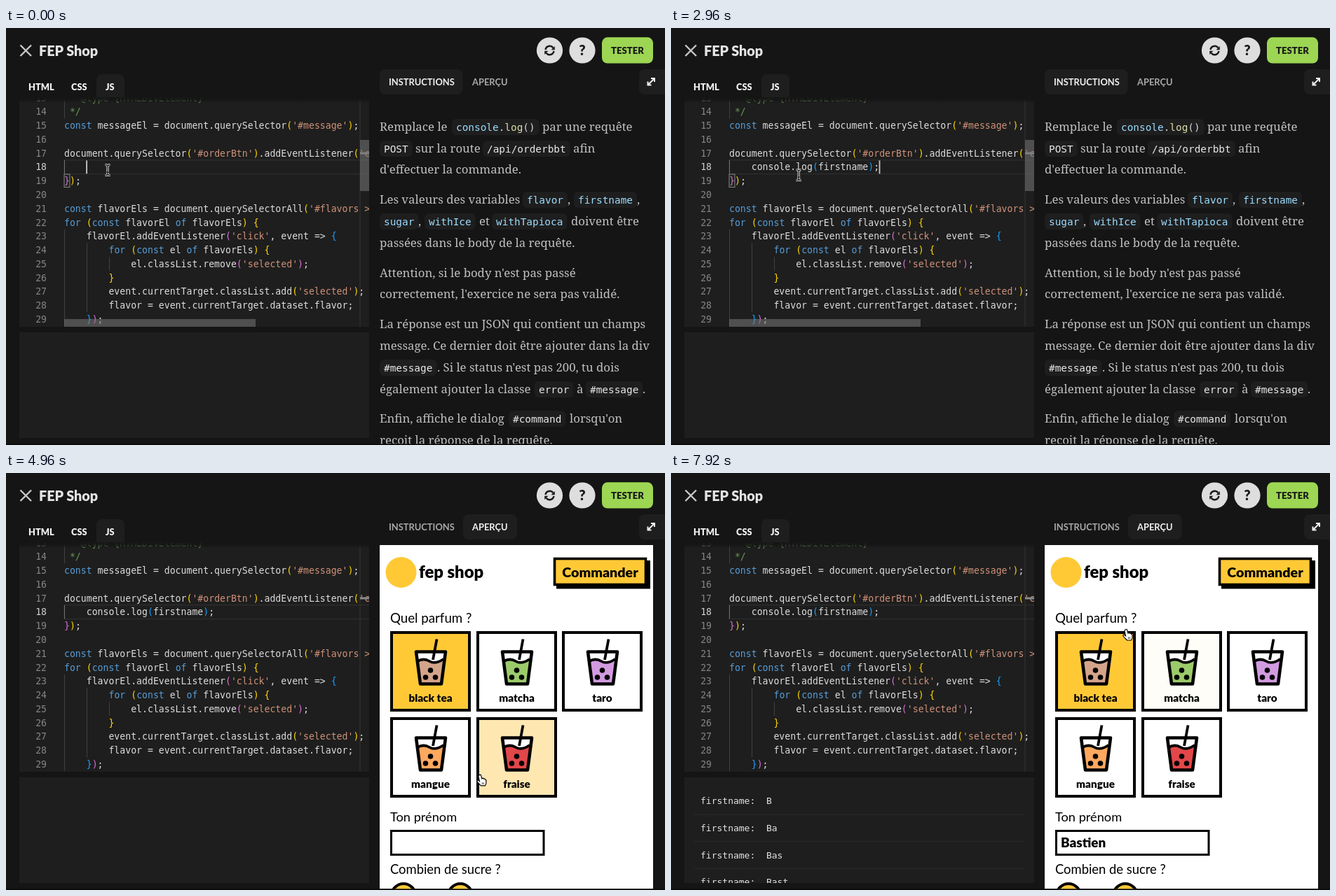
An HTML page that plays this animation: 940 by 596 pixels, repeating every 8 s.

```html
<!DOCTYPE html>
<html lang="fr">
<head>
<meta charset="utf-8">
<title>FEP Shop</title>
<style>
  html, body { margin: 0; width: 100%; height: 100%; overflow: hidden; background: #151515; }
  svg { display: block; width: 940px; height: 596px; }
  text { white-space: pre; }
  .ui { font-family: Lato, sans-serif; font-weight: 700; }
  .heavy { font-family: Lato, sans-serif; font-weight: 900; }
  .plain { font-family: Lato, sans-serif; font-weight: 400; }
  .mono { font-family: "DejaVu Sans Mono", monospace; }
  .serif { font-family: "Noto Serif", serif; }
  .quote { font-family: "Noto Serif", serif; font-style: italic; }
  .sys { font-family: Inter, sans-serif; font-weight: 500; }
</style>
</head>
<body>
<svg id="stage" viewBox="0 0 940 596"></svg>
<script>
const LOOP = 8000, STEP = 80;
const CHAR = 7.93, CODE_X = 83, CODE_SIZE = 13.18, ROW = 19.77;
const YELLOW = '#ffc936';
const NAME = 'Bastien';

const clamp = v => Math.max(0, Math.min(1, v));
const smooth = v => (v = clamp(v)) * v * (3 - 2 * v);
const baseline = line => 124.4 + ROW * (line - 14);

const rect = (x, y, w, h, fill, extra = '') =>
  `<rect x="${x}" y="${y}" width="${w}" height="${h}" fill="${fill}" ${extra}/>`;
const path = (d, stroke, width, fill = 'none', extra = '') =>
  `<path d="${d}" stroke="${stroke}" stroke-width="${width}" fill="${fill}" ${extra}/>`;
const circle = (x, y, r, fill, extra = '') => `<circle cx="${x}" cy="${y}" r="${r}" fill="${fill}" ${extra}/>`;
const text = (cls, x, y, size, fill, content, extra = '') =>
  `<text class="${cls}" x="${x}" y="${y}" font-size="${size}" fill="${fill}" ${extra}>${content}</text>`;
const tint = (fill, content, extra = '') => `<tspan fill="${fill}" ${extra}>${content}</tspan>`;
const bold = (fill, content) => tint(fill, content, 'font-weight="700"');
const at = (steps, t) => steps.filter(s => s[0] <= t).pop();

// ---- Code editor ----
const typing = [
  [0, ''], [160, 'c'], [240, 'co'], [320, 'con'], [400, 'cons'], [480, 'console'],
  [1040, 'console.'], [1120, 'console.l'], [1200, 'console.lo'], [1280, 'console.log'],
  [1440, 'console.log()'], [1840, 'console.log(f)'], [1920, 'console.log(fi)'],
  [2160, 'console.log(firstname)'], [2640, 'console.log(firstname);']
];
const codeLines = typed => [
  ' * @type {HTMLDivElement}',
  ' */',
  "const messageEl = document.querySelector('#message');",
  '',
  "document.querySelector('#orderBtn').addEventListener('click', event => {",
  '    ' + typed,
  '});',
  '',
  "const flavorEls = document.querySelectorAll('#flavors > div');",
  'for (const flavorEl of flavorEls) {',
  "    flavorEl.addEventListener('click', event => {",
  '        for (const el of flavorEls) {',
  "            el.classList.remove('selected');",
  '        }',
  "        event.currentTarget.classList.add('selected');",
  '        flavor = event.currentTarget.dataset.flavor;',
  '    });'
];

function highlighter() {
  const colors = ['#ffd700', '#da70d6', '#179fff'];
  let depth = 0;
  return line => line.startsWith(' *') ? tint('#6a9955', line)
    : line.replace(/'[^']*'|\b(?:const|for|of)\b|[(){}]/g, token => {
      if (token[0] === "'") return tint('#ce9178', token);
      if ('({'.includes(token)) return tint(colors[depth++ % 3], token);
      if (')}'.includes(token)) return tint(colors[--depth % 3], token);
      return tint('#569cd6', token);
    });
}

const bracketBox = (column, line) =>
  rect(CODE_X + column * CHAR, baseline(line) - 14.2, CHAR, 18.5, '#1b3a1b33', 'stroke="#888"');
const guide = (x, from, to, color = '#404040') =>
  path(`M${x} ${baseline(from) - 14.7}V${baseline(to) + 5}`, color, 1);

function editor(t) {
  const typed = at(typing, t)[1];
  const inCall = t >= 1440 && t < 2560;
  const column = 4 + typed.length - (inCall ? 1 : 0);
  const focused = t < 4000;
  const blinkOff = [[640, 880], [1680, 1840], [2320, 2560], [3280, 3840]].some(([a, b]) => t >= a && t < b);
  const barOpacity = .55 * clamp((3450 - t) / 300);
  const paint = highlighter();
  let out = rect(19, 102, 499, 325, '#1e1e1e')
    + rect(CODE_X, baseline(18) - 14.7, 440, ROW, 'none', 'stroke="#2c2c2c" stroke-width="1.5"')
    + guide(83.5, 13, 14) + guide(83.5, 18, 18, '#707070')
    + guide(83.5, 23, 29) + guide(115.5, 24, 28) + guide(147.5, 25, 25);
  if (focused) out += inCall ? bracketBox(15, 18) + bracketBox(column, 18) : bracketBox(0, 19);
  codeLines(typed).forEach((line, i) => {
    const n = 13 + i;
    out += text('mono', 58, baseline(n), CODE_SIZE, n === 18 ? '#d0d0d0' : '#858585', n, 'text-anchor="end"')
      + text('mono', CODE_X, baseline(n), CODE_SIZE, '#dcdcdc', paint(line));
  });
  if (focused && !blinkOff) out += rect(CODE_X + column * CHAR - .5, baseline(18) - 14.2, 1.8, 19, '#c8c8c8');
  out += path('M505 102V427', '#343434', 1) + rect(505, 177.5, 13, 3, '#8a8a8a')
    + `<g opacity="${barOpacity}">${rect(505, 160, 13, 73, '#797979')}${rect(83, 416, 273, 11, '#797979')}</g>`
    + rect(19, 99, 499, 8, 'url(#shade)');
  return `<g clip-path="url(#editorClip)">${out}</g>`;
}

// ---- Completion popups ----
const globals = ['console', 'const', 'continue', 'confirm', 'cookieStore', 'CompositionEvent',
  'CompressionStream', 'ConstantSourceNode', 'ConvolverNode', 'CountQueuingStrategy', 'Comment', 'const'];
const methods = ['assert', 'clear', 'count', 'countReset', 'debug', 'dir', 'dirxml', 'error',
  'group', 'groupCollapsed', 'groupEnd', 'info'];
const fileItems = ['firstname', 'finally', 'File', 'FileList', 'FileReader',
  ...['', 'DirectoryEntry', 'DirectoryHandle', 'DirectoryReader', 'Entry', 'FileEntry', 'FileHandle'].map(s => 'FileSystem' + s)];

function itemIcon(label, x, y) {
  if (label === 'firstname')
    return path(`M${x} ${y + 5}l6-6a3.5 3.5 0 0 1 4-4l-2 2 2 2 2-2a3.5 3.5 0 0 1-4 4l-6 6z`, '#d4d4d4', 1.3);
  if (label === 'finally')
    return path(`M${x} ${y - 4}h5m2 0h5m-12 3h8m2 0h2m-12 3h4m2 0h6m-12 3h9`, '#c5c5c5', 1.4);
  return path(`M${x + 2.5} ${y - 4}h-2v8h2m7-8h2v8h-2`, '#75beff', 1.1)
    + circle(x + 6, y, 2.4, 'none', 'stroke="#75beff"')
    + path(`M${x + 3.5} ${y + 2.5}l5-5`, '#75beff', .9);
}

function suggestions(x, items, matched, detail = '') {
  const top = 209.5, width = 404.5;
  let out = rect(x, top, width, items.length * ROW + 1, '#252526', 'stroke="#454545"')
    + rect(x + .5, top, width - 1, ROW, '#04395e');
  items.forEach((label, i) => {
    const y = top + 10 + i * ROW;
    out += itemIcon(label, x + 4, y) + text('mono', x + 22, y + 4.6, CODE_SIZE, i ? '#d4d4d4' : '#fff',
      bold('#2aaaff', label.slice(0, matched)) + label.slice(matched));
  });
  if (items.length > 11) out += rect(x + 395, top, 9.5, 144.5, '#797979', 'opacity=".6"');
  return out + text('mono', x + 394, top + 14.2, 11.07, '#e0e0e0', detail, 'text-anchor="end"');
}

function popups(t) {
  let out = '';
  if (t >= 1440 && t < 2560)
    out += rect(226.5, 160.5, 209, 28, '#252526', 'stroke="#454545"')
      + text('mono', 233, 179, CODE_SIZE, '#d4d4d4', 'log(' + bold('#18a3ff', '...data: any[]') + '): void');
  if (t >= 240 && t < 480) out += suggestions(131, globals, Math.floor(t / STEP) - 1);
  if (t >= 1040 && t < 1120) out += suggestions(178.5, methods, 0);
  if (t >= 1120 && t < 1280) out += suggestions(178.5, ['log'], t < 1200 ? 1 : 2);
  if (t >= 1920 && t < 2160) out += suggestions(226.5, fileItems, 2, 'let firstname: string');
  return out;
}

// ---- Console ----
const nameLength = t => t < 5840 ? 0 : Math.min(NAME.length, 1 + Math.floor((t - 5840) / 53.3));

function logs(t) {
  let out = rect(19, 435, 499, 151, '#1e1e1e');
  for (let i = 0; i < Math.min(4, nameLength(t)); i++) {
    const y = 468.5 + i * 38.7;
    out += text('mono', 42, y + 4.6, 13, '#e4e4e4', 'firstname:  ' + NAME.slice(0, i + 1))
      + path(`M33 ${y + 19.5}H503`, '#2a2a2a', 1);
  }
  return `<g clip-path="url(#consoleClip)">${out}</g>`;
}

// ---- Instructions ----
const prose = (x, y, s) => text('serif', x, y + 6, 16.8, '#c0c0c0', s);
const quote = (x, y, s) => text('quote', x, y, 14.3, '#c0c0c0', s);
const chip = (x, y, s, color = '#e8e8e8', html = s) =>
  rect(x - 6, y - 11, s.length * 8.67 + 12, 23, '#1e1e1e', 'rx="6"') + text('mono', x, y + 5.5, 14.4, color, html);
const variable = (x, y, s) => chip(x, y, s, '#9cdcfe');

const instructions = prose(533, 141, 'Remplace le')
  + chip(642, 141, 'console.log()', '#d4d4d4', tint('#9cdcfe', 'console') + '.' + tint('#dcdcaa', 'log') + '()')
  + prose(765, 141, 'par une requête')
  + chip(539, 172, 'POST') + prose(584, 172, 'sur la route') + chip(686, 172, '/api/orderbbt') + prose(809, 172, 'afin')
  + prose(533, 202, "d'effectuer la commande.")
  + prose(533, 245, 'Les valeurs des variables') + variable(743, 245, 'flavor') + prose(801, 245, ',')
  + variable(816, 245, 'firstname') + prose(900, 245, ',')
  + variable(539, 276, 'sugar') + prose(588, 276, ',') + variable(603, 276, 'withIce') + prose(675, 276, 'et')
  + variable(699, 276, 'withTapioca') + prose(806, 276, 'doivent être')
  + prose(533, 307, 'passées dans le body de la requête.')
  + prose(533, 350, "Attention, si le body n'est pas passé")
  + prose(533, 380, "correctement, l'exercice ne sera pas validé.")
  + prose(533, 423, 'La réponse est un JSON qui contient un champs')
  + prose(533, 454, 'message. Ce dernier doit être ajouter dans la div')
  + chip(539, 485, '#message') + prose(615, 485, ". Si le status n'est pas 200, tu dois")
  + prose(533, 516, 'également ajouter la classe') + chip(760, 516, 'error') + prose(814, 516, 'à')
  + chip(833, 516, '#message') + prose(908, 516, '.')
  + prose(533, 558, 'Enfin, affiche le dialog') + chip(723, 558, '#command') + prose(804, 558, "lorsqu'on")
  + prose(533, 588.5, 'reçoit la réponse de la requête.')
  + rect(542, 619, 3.5, 73, '#d8d8d8')
  + '<g transform="rotate(-12 569 640)">' + circle(569, 637.5, 4.8, '#f6e3c0') + rect(567, 642, 4, 5, '#a9a9a9', 'rx="1"') + '</g>'
  + quote(580, 646.5, "N'hésite pas à rechercher comment on")
  + quote(560, 674.5, 'affiche un élément')
  + rect(685, 659, 73, 22, '#1e1e1e', 'rx="6"')
  + text('mono', 690, 674.5, 13.1, '#808080', '&lt;' + tint('#569cd6', 'dialog') + '&gt;', 'font-style="italic"')
  + quote(763, 674.5, 'en JavaScript');

function instructionPanel(t) {
  const scroll = 112 * smooth((t - 3200) / 360);
  return `<g clip-path="url(#panelClip)"><g transform="translate(0 ${-scroll})">${instructions}</g></g>`
    + (scroll ? rect(931, 104 + scroll * .82, 7, 394, '#0c0c0c', 'rx="3"') : '');
}

// ---- Preview ----
const cards = [
  ['black tea', '#d4a48a', 548, 226], ['matcha', '#9ccb6b', 671, 226], ['taro', '#d29be0', 793, 226],
  ['mangue', '#ffa85f', 548, 349], ['fraise', '#e2474a', 671, 349]
];
const cup = color =>
  path('M37 29.5H79L73 75.5H43Z', 'none', 0, '#fff')
  + path('M39 43q9-5 17 0t20-3L72 75H43Z', 'none', 0, color)
  + path('M39 43q9-5 17 0t20-3M61 41L66.5 11.5', '#000', 3.8)
  + path('M37 29.5H79L73 75.5H43Z', '#000', 4.6, 'none', 'stroke-linejoin="round"')
  + circle(57.5, 56, 3.8, '#000') + circle(50.5, 66, 3.8, '#000') + circle(64.5, 66, 3.8, '#000');

const inCard = ([x, y], card) => x > card[2] && x < card[2] + 115 && y > card[3] && y < card[3] + 115;

// A 200 ms linear fade equals the share of that window spent inside the card.
function hover(t, card) {
  let inside = 0;
  for (let k = 0; k < 10; k++) {
    const past = t - k * 20;
    if (past >= 4040 && inCard(mouse(past), card)) inside++;
  }
  return inside / 10;
}

function preview(t) {
  let out = rect(533, 103, 390, 491.5, '#fff') + circle(563.5, 142, 22, YELLOW)
    + text('heavy', 589, 150, 23.8, '#000', 'fep shop')
    + rect(785, 125, 134, 40.5, '#000')
    + rect(782.5, 122.5, 130, 37, YELLOW, 'stroke="#000" stroke-width="3.6"')
    + text('heavy', 847.5, 149, 19.7, '#000', 'Commander', 'text-anchor="middle"')
    + text('plain', 548, 213.5, 18.7, '#000', 'Quel parfum ?')
    + text('plain', 548, 498, 18.2, '#000', 'Ton prénom')
    + text('plain', 548, 572.5, 18.4, '#000', 'Combien de sucre ?');
  cards.forEach((card, i) => {
    const [label, color, x, y] = card;
    out += `<g transform="translate(${x} ${y})">` + rect(2, 2, 111, 111, i ? '#fff' : YELLOW)
      + (i ? rect(2, 2, 111, 111, '#ffe7b2', `opacity="${hover(t, card)}"`) : '')
      + rect(2, 2, 111, 111, 'none', 'stroke="#000" stroke-width="4"') + cup(color)
      + text('heavy', 57.5, 100.5, 15.3, '#000', label, 'text-anchor="middle"') + '</g>';
  });
  out += rect(549.5, 511.5, 217.5, 34, '#fff', 'stroke="#000" stroke-width="3"')
    + text('heavy', 556, 535, 18.9, '#000', NAME.slice(0, nameLength(t)));
  for (const x of [567, 648]) out += circle(x, 604, 17, YELLOW, 'stroke="#000" stroke-width="4"');
  if (t >= 5600 && t < 6160)
    out += path('M649 557L658 548L667 557Z', 'none', 0, '#1e1e1e') + rect(639, 556, 146.5, 60, '#1e1e1e', 'rx="7"')
      + text('sys', 650, 581, 12.8, '#e4e4e4', NAME);
  return `<g clip-path="url(#panelClip)">${out}</g>`;
}

// ---- Pointer ----
const stops = [
  [0, 145, 203], [2900, 145, 203], [3280, 700, 310], [3600, 707, 318], [3760, 707, 250], [4000, 692, 80],
  [4060, 692, 80], [4280, 735, 410], [4480, 718, 361], [4640, 715, 370], [4700, 715, 370], [5200, 645, 500],
  [5520, 625, 531], [6340, 625, 531], [6800, 730, 380], [7200, 735, 290], [7640, 735, 290],
  [7765, 667, 246], [7920, 651, 231], [LOOP, 651, 231]
];
function mouse(t) {
  const i = Math.max(1, stops.findIndex(s => s[0] > t));
  const [a, b] = [stops[i - 1], stops[i]];
  const k = smooth((t - a[0]) / (b[0] - a[0]));
  return [a[1] + (b[1] - a[1]) * k, a[2] + (b[2] - a[2]) * k];
}

function pointer(t) {
  if ((t >= 160 && t < 2960) || (t >= 5840 && t < 6400)) return '';
  const [x, y] = mouse(t);
  const showsPreview = t >= 4040;
  const onInput = x > 548 && x < 768 && y > 510 && y < 547;
  const overText = showsPreview ? onInput : y > 105;
  const overLink = y < 95 || (showsPreview && cards.some(c => inCard([x, y], c)));
  const beam = 'M-3.5-7.5Q0-7.5 0-5V5.5Q0 7.5-3.5 7.5M3.5-7.5Q0-7.5 0-5V5.5Q0 7.5 3.5 7.5M-2 3H2';
  const hand = 'M-3-7Q-1.5-8.5-.5-7L1-2Q2.5-3.5 3.5-1.8Q5-2.5 5.7-.7Q7-.8 7 1Q7.5 5 5.5 8H-.5Q-4 4.5-6 2Q-6.5 0-4.5 .2L-2.5 1.7L-4-5Q-4-6.5-3-7Z';
  const shape = overText ? path(beam, '#fff', 3) + path(beam, '#111', 1.3)
    : overLink ? path(hand, '#000', 1.2, '#fff') + path('M1.5 3.5V6M3.5 3.5V6', '#000', .8)
    : path('M-4-8V6L-1 3.5L1 8.5L3.5 7.5L1.3 2.7H5.5Z', '#fff', 1, '#000');
  return `<g transform="translate(${x} ${y})">${shape}</g>`;
}

// ---- Page frame ----
const clip = (id, x, y, w, h) => `<clipPath id="${id}">${rect(x, y, w, h, '#000')}</clipPath>`;
const defs = '<defs>' + clip('editorClip', 19, 99, 499, 328) + clip('consoleClip', 19, 435, 499, 151)
  + clip('panelClip', 533, 103, 398, 491.5)
  + '<linearGradient id="shade" x2="0" y2="1"><stop stop-color="#151515"/><stop offset=".5" stop-color="#151515" stop-opacity=".8"/>'
  + '<stop offset="1" stop-color="#151515" stop-opacity=".1"/></linearGradient></defs>';

const header = path('M20.5 24.5L36 40M36 24.5L20.5 40', '#c8c8c8', 2.4)
  + text('heavy', 47, 39.8, 19.8, '#e4e4e4', 'FEP Shop')
  + circle(775.5, 32, 18.6, '#dedede') + circle(822, 32, 18.6, '#dedede')
  + path('M769.5 31a6.2 6.2 0 0 1 11-2.8M781.5 33a6.2 6.2 0 0 1-11 2.8', '#1a1a1a', 2.4)
  + path('M782.8 26v5.2h-5.2zM768.2 38v-5.2h5.2z', 'none', 0, '#1a1a1a')
  + text('heavy', 822, 39, 20, '#1a1a1a', '?', 'text-anchor="middle"')
  + rect(850, 13.3, 73, 37.2, '#9cd653', 'rx="8"')
  + text('heavy', 886.5, 37, 13.1, '#1a1a1a', 'TESTER', 'text-anchor="middle"')
  + rect(129, 66, 40, 38, '#1e1e1e', 'rx="8"')
  + text('heavy', 32, 89, 12.8, '#f0f0f0', 'HTML') + text('heavy', 93, 89, 12.8, '#f0f0f0', 'CSS')
  + text('heavy', 142, 89, 12.8, '#f0f0f0', 'JS')
  + rect(903, 59, 50, 36, '#1e1e1e', 'rx="8"')
  + path('M916 81L924.5 72.5M920 72H925V77M915.5 76.5V81.5H920.5', '#f0f0f0', 2);

function tabs(t) {
  const second = t >= 4040;
  return rect(second ? 652 : 533, 59, second ? 77 : 118.5, 36, '#1e1e1e', 'rx="8"')
    + text('ui', 546, 81.5, 12.9, second ? '#a8a8a8' : '#f0f0f0', 'INSTRUCTIONS')
    + text('ui', 665, 81.5, 12.9, second ? '#f0f0f0' : '#a8a8a8', 'APERÇU');
}

const stage = document.getElementById('stage');
let shown = -1;
function frame() {
  const t = Math.floor(performance.now() % LOOP / STEP) * STEP;
  if (t !== shown) {
    shown = t;
    stage.innerHTML = defs + rect(0, 0, 940, 596, '#151515') + header + tabs(t) + editor(t) + logs(t)
      + (t < 4040 ? instructionPanel(t) : preview(t)) + rect(0, 594.5, 940, 1.5, '#080808') + popups(t) + pointer(t);
  }
  requestAnimationFrame(frame);
}
frame();
</script>
</body>
</html>
```
